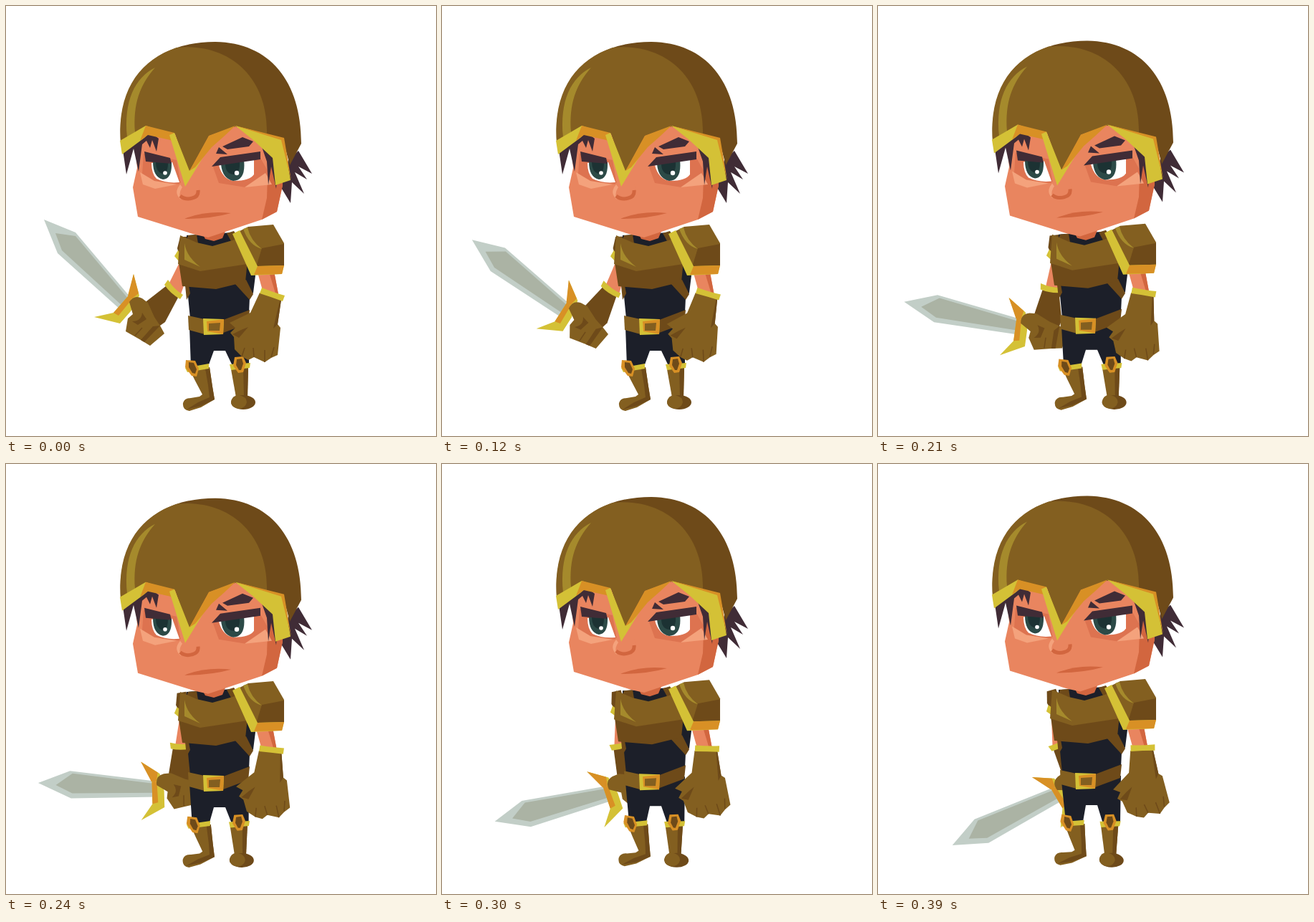
These frames come from a looping animation (600 by 600 pixels, 0.42 s). An HTML page:

```html
<!DOCTYPE html>
<html lang="en">
<head>
<meta charset="utf-8">
<title>Young knight, idle</title>
<style>
html, body { margin: 0; width: 100%; height: 100%; overflow: hidden; background: #fff; }
svg { display: block; width: 100vw; height: 100vh; }
.b { fill: #835f20; }
.d { fill: #6e4a19; }
.h { fill: #a58a2c; }
.y { fill: #d4c136; }
.o { fill: #d89025; }
.n { fill: #1c1f29; }
.s { fill: #e9855f; }
.r { fill: #d2663f; }
.l { fill: #f4a27c; }
.k { fill: #402c36; }
.w { fill: #fff; }
.line { fill: none; stroke: #6e4a19; stroke-width: 1.5; }
</style>
</head>
<body>
<svg viewBox="0 0 600 600">
  <path id="upperArm" class="s"/>
  <g id="swordArm">
    <path fill="#c2cec7" d="M53 298L97 316 174 407 160 424 72 345Z"/>
    <path fill="#abb3a4" d="M69 317L97 321 171 409 163 419 78 341Z"/>
    <path class="y" d="M123 434L150 428 171 404 178 374 186 404 174 426 159 443Z"/>
    <path class="o" d="M178 374L185 401 175 409 170 404ZM150 428L171 404 175 410 157 432Z"/>
    <path class="d" d="M223 391L240 407 222 441 212 448 190 428 196 412Z"/>
    <path class="b" d="M172 413Q179 402 190 408L198 414 207 434 215 446 221 457 201 474 188 466 167 454 170 436 177 430Z"/>
    <path class="d" d="M176 440Q189 440 190 428L196 437 184 445ZM188 466L205 447 215 446 193 469Z"/>
    <path class="line" d="M180 460L190 449"/>
    <path class="y" d="M226 382Q235 396 247 403L243 409Q229 401 221 389Z"/>
  </g>
  <g id="leftPad">
    <path class="d" d="M243 322L239 338 243 353 258 350 256 322Z"/>
    <path class="y" d="M240 341L235 349 241 356 246 348Z"/>
  </g>

  <path id="trousers" class="n"/>
  <g id="leftBoot">
    <path class="b" d="M257 509L284 504 288 531 291 549 272 560 256 565Q246 564 247 554 249 547 258 547L270 545 274 542 264 523Z"/>
    <path class="d" d="M278 506L284 504 288 531 291 549 272 558 252 563 268 553 284 546 282 529Z"/>
    <path class="y" d="M250 505L283 499 283 506 253 511Z"/>
    <path class="o" d="M251 494L264 495 269 506 266 517 259 516 250 504Z"/>
    <path class="d" d="M255 497L262 498 266 507 264 513 260 512 255 504Z"/>
  </g>
  <g id="rightBoot">
    <path class="b" d="M314 507L338 504 337 545 321 546Z"/>
    <path class="d" d="M331 505L338 504 337 545 332 545Z"/>
    <ellipse class="d" cx="331" cy="553" rx="17" ry="10"/>
    <path class="b" d="M314 553Q315 543 325 543 336 545 336 553 334 561 325 562 315 561 314 553Z"/>
    <path class="y" d="M312 500L341 498 340 505 314 508Z"/>
    <path class="o" d="M319 490L331 489 335 498 331 511 324 512 317 502Z"/>
    <path class="d" d="M322 493L329 492 331 499 328 508 325 508 321 501Z"/>
  </g>

  <g class="rise">
    <path class="n" d="M252 320L316 316 334 350 348 376 345 400 340 407 339 428 300 440 257 436 253 395Z"/>
    <path class="d" d="M250 390L255 390 257 401 252 410ZM318 386L335 382 345 402 340 410Z"/>
    <path class="d" d="M254 320L266 319 268 331 252 326ZM308 317L318 314 326 326 314 328Z"/>
    <path class="r" d="M272 314L307 312 302 324 290 328 278 325Z"/>
    <path class="d" d="M241 358L274 369 337 355 334 385 293 395 246 391Z"/>
    <path class="b" d="M243 320L266 330 288 335 323 325 337 360 271 370 240 360Z"/>
    <path class="h" d="M249 331Q252 350 271 364L249 354Z"/>
    <path class="b" d="M254 432L277 437 277 458 255 452Z"/>
    <path class="d" d="M303 438L340 424 338 443 303 456Z"/>
    <path class="y" d="M275 436L304 437 303 458 276 459Z"/>
    <path class="o" d="M280 440L304 437 303 458 281 454Z"/>
    <path class="b" d="M283 443L299 442 298 453 283 453Z"/>
  </g>

  <g id="rightArm">
    <path class="s" d="M350 368L374 370 380 402 358 397Z"/>
    <path class="r" d="M366 368L374 370 380 402 376 401Z"/>
  </g>
  <g id="rightHand">
    <path class="b" d="M354 400L384 410 379 444 383 449 379 487 370 491 361 497 346 490 338 494 329 489 319 479 318 462 313 456 320 449 312 442 341 428Z"/>
    <path class="d" d="M382 411L384 410 379 444 373 450ZM316 458L328 452 338 448 325 463Z"/>
    <path class="line" d="M329 489L333 477M346 490L345 477M361 497L361 480M370 490L374 476"/>
    <path class="y" d="M357 393Q374 400 389 404L386 412Q370 406 354 401Z"/>
  </g>
  <g class="rise">
    <path class="b" d="M326 314L338 308 373 305 388 331 388 363 349 364Z"/>
    <path class="d" d="M357 338L388 332 388 363 349 364Z"/>
    <path class="h" d="M331 311L337 309Q341 327 357 339 339 334 331 311Z"/>
    <path class="y" d="M316 318L326 313 351 363 388 362 385 374 342 376Z"/>
    <path class="o" d="M351 363L388 362 385 374 346 375Z"/>
  </g>

  <g id="head">
    <path class="k" d="M394 215L408 202 427 234 408 224 420 242 403 232 416 262 399 246 397 275 383 252Z"/>
    <path class="s" d="M180 195L183 226 177 253 184 294 264 319 282 323 300 317 357 298 378 287 386 250 382 190 320 160 196 160Z"/>
    <path class="r" d="M366 205L383 200 386 250 378 287 357 298 364 268Z"/>
    <path fill="#dd7350" d="M192 206L238 215 244 249 206 245 190 234ZM288 222L355 212 368 235 334 253 297 247Z"/>
    <path class="l" d="M187 232L207 244 238 249 208 255 191 249ZM362 233L371 249 333 253Z"/>
    <path class="w" d="M203 219L232 218 242 246Q224 248 210 241 203 234 203 219Z"/>
    <path class="w" d="M297 222L346 212V235Q340 244 318 244 302 242 297 222Z"/>
    <path fill="#2c4a47" d="M205 217L231 218Q232 241 219 242 205 239 205 217ZM300 221L332 215Q335 243 317 244 302 241 300 221Z"/>
    <path fill="#1c3233" d="M209 218L226 219Q226 234 218 234 209 231 209 218ZM306 220L326 217Q327 235 316 235 306 233 306 220Z"/>
    <circle class="w" cx="222" cy="233" r="2.8"/>
    <circle class="w" cx="322" cy="233" r="3.2"/>
    <path class="k" d="M193 203L229 212 231 220 195 217ZM287 224L299 211 355 203 355 214Z"/>
    <path class="s" d="M242 247L268 247Q275 267 256 270 236 270 242 247Z"/>
    <path class="l" d="M243 249Q233 261 244 270 240 261 246 253Z"/>
    <path fill="none" stroke="#d2663f" stroke-width="5" d="M243 265Q250 271 260 268 269 266 268 257"/>
    <path class="r" d="M249 297Q278 285 314 289 286 297 249 297Z"/>
    <path class="k" d="M163 201L168 235 178 199 185 231 190 193 196 188 201 198 204 187 210 203 213 185 196 172ZM302 196L330 183 345 189 339 196 309 200ZM297 197L309 207 293 206ZM356 194L364 217 366 250 370 224 377 255 380 210 365 190Z"/>
    <path class="d" d="M160 190C155 100 208 50 292 50C368 51 412 105 412 192L396 222 386 185 320 168 283 181 255 232 236 178 196 168Z"/>
    <path class="b" d="M160 190C155 120 185 76 238 58C310 51 366 98 364 179L320 168 283 181 255 232 236 178 196 168Z"/>
    <path class="h" d="M208 86C180 100 164 132 169 183L180 176C177 136 187 110 208 86Z"/>
    <path class="y" d="M159 188L195 167 207 171 193 184 162 207Z"/>
    <path class="o" d="M195 167L235 177 238 192 229 187 198 180 187 188Z"/>
    <path class="y" d="M228 180L235 177 256 230 283 198 250 252Z"/>
    <path class="o" d="M256 230L283 181 320 167 304 182 287 197 264 225Z"/>
    <path class="y" d="M320 167L387 185 397 243 376 250 372 212 345 187Z"/>
    <path class="o" d="M320 167L388 184 398 243 384 187Z"/>
  </g>
</svg>
<script>
const LOOP = 420, STEP = 30;
const $ = id => document.getElementById(id);
const rising = document.querySelectorAll('.rise');

const ease = (t, from) => {
  const x = Math.min(1, Math.max(0, (t - from) / (390 - from)));
  return x * x * (3 - 2 * x);
};

// Turn by deg about (x, y), then shift by (dx, dy).
const pose = (id, deg, x, y, dx, dy) =>
  $(id).setAttribute('transform', `translate(${dx} ${dy}) rotate(${deg} ${x} ${y})`);

const spin = (px, py, deg, x, y) => {
  const a = deg * Math.PI / 180, c = Math.cos(a), s = Math.sin(a);
  return [x + (px - x) * c - (py - y) * s, y + (px - x) * s + (py - y) * c];
};

const poly = (id, pts) => $(id).setAttribute('d', 'M' + pts.map(p => p.join(' ')).join('L') + 'Z');

function draw(ms) {
  // The first pose is held for two steps.
  let t = Math.floor((ms % LOOP) / STEP) * STEP;
  if (t < 60) t = 0;
  const swing = ease(t, 45), lift = ease(t, 120);
  const up = -5 * lift, turn = -71.8 * swing, sag = -2.4 * Math.sin(Math.PI * swing);

  pose('head', 0, 0, 0, 0, -5.5 * lift);
  rising.forEach(g => g.setAttribute('transform', `translate(0 ${up})`));

  pose('swordArm', turn, 240, 380, sag, sag);
  pose('leftPad', -15 * swing, 240, 350, 0, up);
  poly('upperArm', [[242, 358 + up], [258, 362 + up],
    spin(244, 402, turn, 240, 380), spin(227, 388, turn, 240, 380)]);

  pose('rightArm', 0, 0, 0, -3 * swing, up * 0.6);
  pose('rightHand', -21 * swing, 355, 394, -4 * swing, 0);

  pose('leftBoot', 5.7 * lift, 260, 503, 4.5 * lift, -4.5 * lift);
  pose('rightBoot', 2.9 * lift, 326, 500, -2.5 * lift, -0.5 * lift);
  poly('trousers', [[256, 448 + up], [339, 440 + up], [339 - lift, 499],
    [316 - 2 * lift, 502], [306, 481 + up], [290, 481 + up],
    [282 + 4 * lift, 503 - 4 * lift], [258 + 4 * lift, 503 - 4 * lift]]);
}

const start = performance.now();
function tick() {
  draw(performance.now() - start);
  requestAnimationFrame(tick);
}
tick();
</script>
</body>
</html>
```
